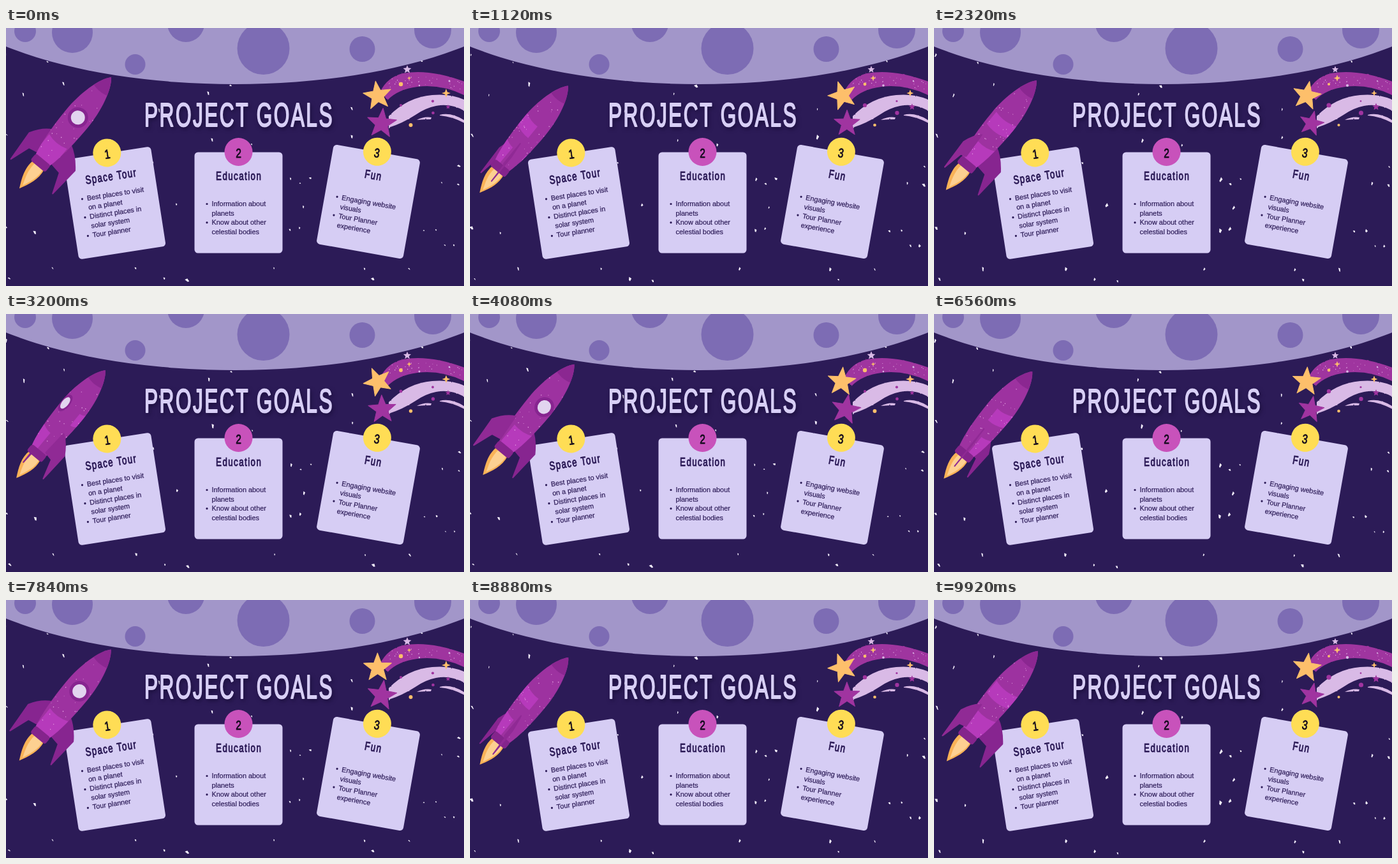
Animation, 718 px wide and 404 px high, one loop 10 s. Source, as an HTML page:

```html
<!DOCTYPE html>
<html lang="en">
<head>
<meta charset="utf-8">
<title>Project goals</title>
<style>
  html, body { margin: 0; width: 100%; height: 100%; overflow: hidden; background: #2c1b57; }
  svg { display: block; width: 718px; height: 404px; }
  text { font-family: "Liberation Sans", Arial, sans-serif; }
  .hand { stroke-linejoin: round; text-anchor: middle; }
  .title { font-size: 51px; letter-spacing: 4px; fill: #d8cff6; stroke: #d8cff6; stroke-width: 2.2; }
  .head { font-size: 18.5px; letter-spacing: 2px; fill: #2c1b57; stroke: #2c1b57; stroke-width: 1; }
  .num { font-size: 20px; fill: #120a1c; stroke: #120a1c; stroke-width: .8; }
  .list { font-size: 10.9px; fill: #2c1b57; stroke: #2c1b57; stroke-width: .2; }
  .shade { filter: drop-shadow(2px 3px 3px rgba(12, 4, 40, .55)); }
</style>
</head>
<body>
<svg viewBox="0 0 718 404">
  <defs>
    <path id="hull" d="M0 0C13 14 22 50 22 85C22 120 19 150 14 169H-14C-19 150 -22 120 -22 85C-22 50 -13 14 0 0Z"/>
    <clipPath id="inHull"><use href="#hull"/></clipPath>
    <filter id="rough" x="-5%" y="-10%" width="110%" height="120%">
      <feTurbulence type="fractalNoise" baseFrequency=".18" numOctaves="2" seed="4"/>
      <feDisplacementMap in="SourceGraphic" scale="2" xChannelSelector="R" yChannelSelector="G"/>
    </filter>
  </defs>

  <rect width="718" height="404" fill="#2c1b57"/>
  <g id="flecks" fill="#f4effc"></g>

  <ellipse cx="359" cy="-97" rx="490" ry="185" fill="#a296c9"/>
  <g id="craters" fill="#7d6cb4"></g>

  <g class="shade">
    <text class="hand title" transform="translate(365.5 154) scale(.62 1)">PROJECT GOALS</text>
  </g>

  <g filter="url(#rough)">
    <path fill="#9f359f" d="M587 99Q598 77 622 71Q666 63 724 86V108Q684 87 645 92Q614 96 598 113Z"/>
    <path fill="#d9bae6" d="M600 138Q630 108 668 105Q700 102 724 115V133Q700 117 674 122Q658 125 642 136Q622 149 600 156Z"/>
    <path fill="#d9bae6" d="M644 144Q655 138 667 140L666 143Q655 143 644 144ZM680 136Q700 131 724 148V152Q703 139 680 137Z"/>
  </g>
  <g id="dust" fill="#e9b4e8"></g>
  <g id="comets"></g>

  <g id="cards"></g>

  <g id="rocket">
    <path fill="#fab257" d="M-11 178C-15 196 -7 212 0 226C7 212 15 196 11 178Z"/>
    <path fill="#fdd091" d="M-6 178C-9 196 -2 210 1 219C5 209 13 194 9 178Z"/>
    <path id="finsBack" fill="#872590" stroke="#872590" stroke-width="2" stroke-linejoin="round"/>
    <use href="#hull" fill="#9d32a0"/>
    <g clip-path="url(#inHull)">
      <path id="bands" fill="#b63abb"/>
      <path fill="#8b2791" d="M-26 21Q0 36 26 21V-4H-26Z"/>
      <g id="specks" fill="#efb5ec"></g>
      <ellipse id="rim" cy="82" fill="#872590"/>
      <ellipse id="glass" cy="82" fill="#e2d4ef"/>
    </g>
    <rect x="-15" y="167" width="30" height="14" rx="4" fill="#84248c"/>
    <path id="finsFront" fill="#902a95" stroke="#902a95" stroke-width="2" stroke-linejoin="round"/>
  </g>
</svg>
<script>
const LOOP = 10000, SPIN = 3860, RAD = Math.PI / 180;
const $ = id => document.getElementById(id);

function add(parent, tag, attrs, text) {
  const el = document.createElementNS("http://www.w3.org/2000/svg", tag);
  set(el, attrs);
  if (text) el.textContent = text;
  return parent.appendChild(el);
}
function set(el, attrs) {
  for (const k in attrs) el.setAttribute(k, attrs[k]);
}
function random(seed) {
  return () => (seed = seed * 16807 % 2147483647) / 2147483647;
}
function star(points, r, inner) {
  let d = "";
  for (let i = 0; i < points * 2; i++) {
    const a = i * Math.PI / points, q = i % 2 ? r * inner : r;
    d += (i ? "L" : "M") + (q * Math.sin(a)).toFixed(2) + " " + (-q * Math.cos(a)).toFixed(2);
  }
  return d + "Z";
}

// Planet
for (const [cx, cy, r] of [[30, 5, 17], [104, 7, 32], [202.5, 57, 16], [282, -7, 29],
  [403.5, 32, 41], [558.5, 33, 20], [669, 3, 29]]) add($("craters"), "circle", { cx, cy, r });

// Cards: a leading "*" starts a bullet
const cards = [
  { x: 170.5, y: 274, turn: -8.8, dot: "#ffdd55", head: "Space Tour", top: -10.4,
    lines: ["*Best places to visit", "on a planet", "*Distinct places in", "solar system", "*Tour planner"] },
  { x: 364.5, y: 273.5, turn: 0, dot: "#c852bb", head: "Education", top: 5.5,
    lines: ["*Information about", "planets", "*Know about other", "celestial bodies"] },
  { x: 568, y: 272, turn: 10.1, dot: "#ffdd55", head: "Fun", top: 4.5,
    lines: ["*Engaging website", "visuals", "*Tour Planner", "experience"] }
];
cards.forEach((c, i) => {
  const g = add($("cards"), "g", { transform: `translate(${c.x} ${c.y}) rotate(${c.turn})` });
  add(g, "rect", { x: -69, y: -79, width: 138, height: 158, rx: 5.5, fill: "#d6cdf4" });
  add(g, "circle", { cy: -79.5, r: 22, fill: c.dot });
  add(g, "text", { class: "hand num", transform: "translate(0 -70.5) scale(.78 1)" }, String(i + 1));
  add(g, "text", { class: "hand head", transform: "translate(.7 -36) scale(.72 1)" }, c.head);
  c.lines.forEach((line, n) => {
    const y = c.top + n * 14.6;
    if (line[0] === "*") add(g, "circle", { cx: -49.5, cy: y - 3.5, r: 1.6, fill: "#2c1b57" });
    add(g, "text", { class: "list", x: -42, y }, line.replace("*", ""));
  });
});

// Background flecks
const places = [[67, 54], [29, 105], [92, 88], [2, 313], [47, 321], [75, 377], [7, 393], [3, 168],
  [1, 42], [231, 211], [242, 130], [319, 103], [354, 91], [387, 183], [463, 244], [448, 237],
  [479, 236], [447, 317], [422, 377], [325, 176], [286, 396], [250, 393], [269, 277], [544, 127],
  [544, 171], [657, 318], [676, 317], [685, 243], [711, 246], [712, 217], [690, 341], [634, 378],
  [577, 394], [564, 378], [653, 52], [468, 281], [462, 314], [530, 291], [205, 377], [704, 341]];
const rnd = random(77);
const flecks = places.map(([x, y]) => {
  const w = 1 + rnd() * .9, h = 1.6 + rnd() * 1.6;
  return { x, y, turn: rnd() * 80 - 40, phase: rnd() * .8,
    el: add($("flecks"), "path", { d: `M${-w} ${-h}L${w} ${-h * .6}L${w * .7} ${h}L${-w * .4} ${h * .7}Z` }) };
});

// Comet decoration
for (let i = 0; i < 34; i++) {
  const u = rnd(), x = 600 + u * 116;
  add($("dust"), "circle", { cx: x, cy: 76 + 22 * (u - .4) ** 2 + rnd() * 14, r: .35 + rnd() * .4 });
}
const PINK = "#a034a0", GOLD = "#fdbf6b", PALE = "#d9bae6";
const comet = (d, fill) => add($("comets"), "path", { d, fill, stroke: fill, "stroke-width": 1, "stroke-linejoin": "round" });
const goldStar = comet(star(5, 23, .42), GOLD);
const pinkStar = comet(star(5, 23.5, .42), PINK);

// points (0 = dot), x, y, radius, pulse, colour
const sparks = [
  [5, 629, 65, 6, .12, PALE], [4, 632, 78.5, 4.3, -.25, GOLD], [4, 690, 102, 5.8, .2, GOLD],
  [5, 693, 123.5, 5, -.25, PINK], [0, 619, 88, 2.6, .25, GOLD], [0, 619, 121, 2.9, -.3, PINK],
  [0, 669.5, 133, 3, -.22, PINK], [0, 669, 114.5, 1.7, .25, PINK], [0, 634.5, 152, 2.5, .2, GOLD],
  [0, 680, 74, 1.8, -.25, PINK], [0, 648, 90, 1.7, -.3, PALE], [0, 695, 83, 1.2, .2, PALE]
].map(([n, x, y, r, pulse, fill]) => ({ x, y, pulse,
  el: n ? add($("comets"), "path", { d: star(n, r, n > 4 ? .45 : .38), fill })
        : add($("comets"), "circle", { r, fill }) }));

// Rocket surface
const specks = Array.from({ length: 70 }, () => ({
  y: 32 + rnd() * 130, a: rnd() * 2 * Math.PI, el: add($("specks"), "circle", { r: .4 + rnd() * .4 })
}));

function fin(deg) {
  const s = Math.sin(deg * RAD), p = (x, y, dx = 0) => `${(x * s + dx).toFixed(2)} ${y}`;
  return `M${p(19, 122)}Q${p(35, 130, 1)} ${p(48, 149, 3)}L${p(44, 199, 3)}L${p(32, 167, 2)}L${p(15, 164)}Z`;
}
// Part of a painted ring that faces the viewer
function patch(deg, half, y0, y1) {
  const mid = ((deg + 180) % 360 + 360) % 360 - 180;
  const lo = Math.max(mid - half, -90), hi = Math.min(mid + half, 90);
  if (lo >= hi) return "";
  const a = 23 * Math.sin(lo * RAD), b = 23 * Math.sin(hi * RAD), sag = x => 7 * (1 - (x / 23) ** 2);
  const m = (a + b) / 2, curve = (y, x) => y + sag(x);
  return `M${a} ${curve(y0, a)}Q${m} ${curve(y0 + 2, m)} ${b} ${curve(y0, b)}` +
    `L${b} ${curve(y1, b)}Q${m} ${curve(y1 + 2, m)} ${a} ${curve(y1, a)}Z`;
}

function drawRocket(t) {
  const deg = t / SPIN * 360, a = deg * RAD, face = Math.cos(a);
  const dip = (1 - Math.cos(2 * a)) / 2;
  set($("rocket"), { transform:
    `translate(${165 - 12 * dip} ${77 + 14.4 * dip}) rotate(39.6) scale(1 ${1 - .04 * dip})` });
  let back = "", front = "";
  for (const f of [deg - 105, deg + 105]) {
    if (Math.cos(f * RAD) > 0) front += fin(f); else back += fin(f);
  }
  set($("finsBack"), { d: back });
  set($("finsFront"), { d: front });
  set($("bands"), { d: patch(deg + 180, 85, 76, 100) + patch(deg, 52, 128, 164) + patch(deg + 180, 62, 128, 164) });
  const cx = 18 * Math.sin(a), open = Math.max(face, 0);
  set($("rim"), { cx, rx: 16 * open, ry: face > 0 ? 16 : 0 });
  set($("glass"), { cx, rx: 11 * open, ry: face > 0 ? 11 : 0 });
  for (const s of specks) {
    set(s.el, { cx: 21 * Math.sin(s.a + a), cy: s.y, opacity: Math.cos(s.a + a) > 0 ? .85 : 0 });
  }
}

function drawSky(t) {
  const a = t / SPIN * 2 * Math.PI, sway = -Math.cos(a), rock = Math.sin(2 * a);
  for (const f of flecks) {
    const size = .95 + .3 * Math.cos(a + f.phase * 6);
    set(f.el, { transform: `translate(${f.x + 2 * sway} ${f.y + .8 * sway}) rotate(${f.turn + 18 * sway}) scale(${size})` });
  }
  set(goldStar, { transform: `translate(${583.5 + sway} 106) rotate(${20 * rock - 8})` });
  set(pinkStar, { transform: `translate(${590.5 + 1.5 * sway} 149.5) rotate(${5 + 9 * rock}) scale(${.93 - .09 * sway})` });
  for (const s of sparks) {
    set(s.el, { transform: `translate(${s.x} ${s.y}) scale(${1 - s.pulse * sway})` });
  }
}

const start = performance.now();
function frame() {
  const t = (performance.now() - start) % LOOP;
  drawRocket(t);
  drawSky(t);
  requestAnimationFrame(frame);
}
frame();
</script>
</body>
</html>
```
